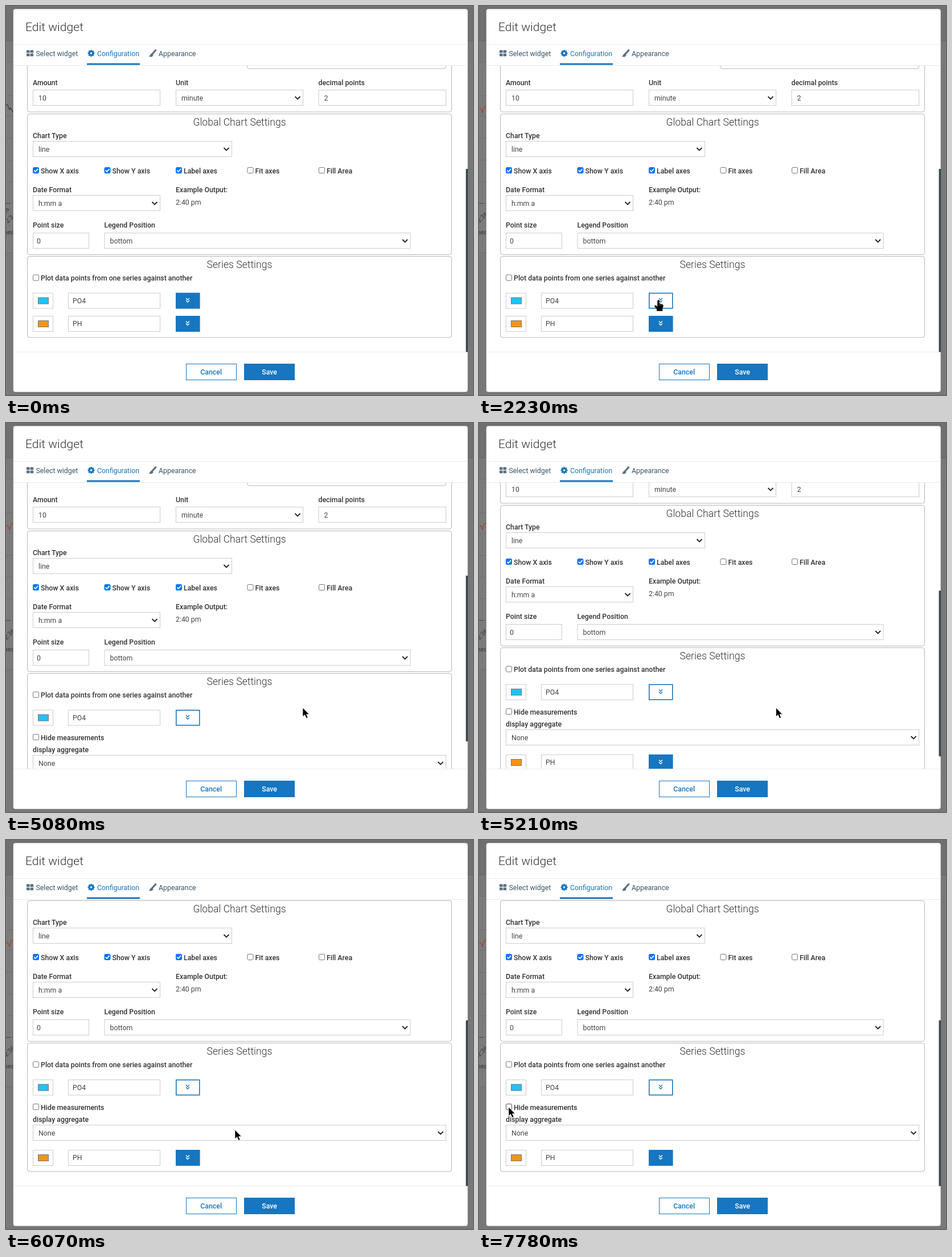
Animation of 820 by 683 pixels, one loop 8000 ms. Source, as an HTML page:

```html
<!DOCTYPE html>
<html lang="en">
<head>
<meta charset="utf-8">
<title>Edit widget</title>
<style>
html, body { margin: 0; width: 100%; height: 100%; overflow: hidden; background: #787878; }
svg { display: block; width: 820px; height: 683px; font: 400 12.35px Roboto, Arial, sans-serif; fill: #444; }
.label { font-weight: 500; fill: #333; }
.heading { font-weight: 300; font-size: 17.6px; fill: #333; text-anchor: middle; }
</style>
</head>
<body>
<svg id="stage" viewBox="0 0 820 683" xmlns="http://www.w3.org/2000/svg"></svg>
<script>
const LOOP = 8000;
const BLUE = '#1776bf';

// Markup helpers
const text = (x, y, s, cls = '', extra = '') => `<text x="${x}" y="${y}" class="${cls}" ${extra}>${s}</text>`;
const label = (x, y, s) => text(x, y, s, 'label');
const box = (x, y, w, h, fill = '#fff', stroke = 'none', rx = 0, extra = '') =>
  `<rect x="${x}" y="${y}" width="${w}" height="${h}" rx="${rx}" fill="${fill}" stroke="${stroke}" ${extra}/>`;
const line = (d, stroke, width = 1, extra = '') =>
  `<path d="${d}" fill="none" stroke="${stroke}" stroke-width="${width}" ${extra}/>`;
const group = (id, body, extra = '') => `<g id="${id}" ${extra}>${body}</g>`;

const input = (x, y, w, s) => box(x + .5, y + .5, w - 1, 27, '#fff', '#ccc') + text(x + 10, y + 18.5, s);
const select = (x, y, w, s) => input(x, y, w, s) +
  line(`M${x + w - 14.5} ${y + 12}l4.5 4.5l4.5-4.5`, '#222', 1.8);
const fieldset = (y, h) => box(37.5, y, 745, h, 'none', '#b5b5b5', 4);
const check = (x, y, s, on, id = '') =>
  box(x + .5, y + .5, 10, 10, on ? '#0075ff' : '#fff', on ? '#0075ff' : '#767676', 1.8, id && `id="${id}"`) +
  (on ? line(`M${x + 2.3} ${y + 5.6}l2.4 2.5l4.3-5`, '#fff', 1.7) : '') +
  label(x + 14, y + 10.5, s);
const chevrons = (x, y, color, id = '') =>
  line(`M${x - 3} ${y - 4}l3 3l3-3M${x - 3} ${y}l3 3l3-3`, color, 1.4, id && `id="${id}"`);

const series = (y, name, color, id) =>
  box(47.5, y + .5, 35, 27, '#fff', '#ccc') +
  box(56.5, y + 8.5, 18, 11, color, '#777') +
  box(109.5, y + .5, 161, 27, '#fff', '#ccc') + text(117, y + 18, name) +
  box(298.8, y + .8, 41, 26.4, BLUE, BLUE, 0, `id="${id}" stroke-width="1.6"`) +
  chevrons(319, y + 13.5, '#fff', id + 'Icon');

function backdrop() {
  const grid = [157, 193, 232, 270, 308, 346].map(y => `M0 ${y}.5H14`).join('');
  const tilted = (x, y, s) => text(x, y, s, '', `transform="rotate(-45 ${x} ${y})" style="fill:#333;font-size:11px"`);
  return box(0, 0, 820, 683, '#787878') + box(0, 0, 820, 60, '#707070') +
    box(0, 60, 820, 2, '#6b6b6b') + box(0, 98, 14, 335, '#7b7b7b') +
    line('M0 98.5H14M0 433.5H14', '#6c6c6c') + line(grid, '#6d6d6d') +
    line('M0 346.5H8', '#444') +
    group('chartBefore', line('M0 173l3 1l3 8l2-3l4 7h2', '#333', 1.2) + tilted(0, 365, 'm') + tilted(3, 382, '2:3')) +
    group('chartAfter', line('M0 181l3-1l3 7l4-11l4 1', '#a1402f', 1.2) + tilted(1, 381, '2:36')) +
    text(-7, 401, 'mea', '', 'style="fill:#333;font-size:11px"');
}

function header() {
  const teeth = Array.from({ length: 8 }, (_, i) =>
    box(148.2, 77, 2.8, 3, BLUE, 'none', .4, `transform="rotate(${i * 45} 149.6 83)"`)).join('');
  const tiles = [[36, 77.5], [42.6, 77.5], [36, 83.4], [42.6, 83.4]]
    .map(([x, y]) => box(x, y, 5.6, 4.8, '#5b7083', 'none', .5)).join('');
  return text(34, 43.5, 'Edit widget', '', 'style="font-weight:300;font-size:21.1px;fill:#333"') +
    line('M13 67.5H811', '#ececec') + line('M13 104.5H811', '#e8e8e8') +
    tiles + text(52.5, 88, 'Select widget', '', 'fill="#3c5468"') +
    teeth + `<circle cx="149.6" cy="83" r="3.2" fill="none" stroke="${BLUE}" stroke-width="2.8"/>` +
    text(160, 88, 'Configuration', '', `fill="${BLUE}"`) + box(142, 100.5, 93, 3, BLUE) +
    line('M257.5 83.5L262.8 77.6', '#5b7083', 3.2, 'stroke-linecap="round"') +
    '<path d="M256 83.2l2.6 2.5c-.5 3.6-4.4 4.6-7.7 2.8c2.4-.7 1.6-4.3 5.1-5.3z" fill="#5b7083"/>' +
    text(268, 88, 'Appearance', '', 'fill="#3c5468"');
}

function form() {
  return box(423.5, 60, 349, 50, 'none', '#b5b5b5', 4) + fieldset(40, 146) +
    label(47, 139, 'Amount') + input(47, 147, 224, '10') +
    label(298, 139, 'Unit') + select(298, 147, 224, 'minute') +
    label(548.5, 139, 'decimal points') + input(548.5, 147, 224.5, '2') +
    fieldset(189.5, 247) + text(410, 209.5, 'Global Chart Settings', 'heading') +
    label(47, 232, 'Chart Type') + select(47, 237, 350, 'line') +
    ['Show X axis', 'Show Y axis', 'Label axes', 'Fit axes', 'Fill Area']
      .map((s, i) => check(47 + i * 125.5, 283, s, i < 3)).join('') +
    label(47, 327, 'Date Format') + select(47, 332, 224, 'h:mm a') +
    label(298, 327, 'Example Output:') + text(298, 349, '2:40 pm') +
    label(47, 389, 'Point size') + input(47, 398, 99, '0').replace('x="57"', 'x="54"') +
    label(172.5, 389, 'Legend Position') + select(172.5, 398, 538, 'bottom') +
    box(37.5, 439.5, 745, 142.5, 'none', '#b5b5b5', 4, 'id="seriesBox"') +
    text(410, 460, 'Series Settings', 'heading') +
    check(47, 471.5, 'Plot data points from one series against another', false) +
    series(503.5, 'PO4', '#1fc3f5', 'firstButton') +
    group('details', check(47, 546, 'Hide measurements', false, 'hideCheck') +
      label(47, 577.5, 'display aggregate') + select(47, 583, 726, 'None')) +
    group('second', series(544, 'PH', '#f29417', 'secondButton'));
}

const footer = () => line('M13 607.5H811', '#ececec') +
  box(316.5, 628.5, 88, 28, '#fff', BLUE) + box(418, 628, 89, 29, BLUE) +
  text(360.2, 647, 'Cancel', 'label', `text-anchor="middle" style="fill:${BLUE}"`) +
  text(462.6, 647, 'Save', 'label', 'text-anchor="middle" style="fill:#fff"');

const arrow = '<path d="M0 0V15.6L3.6 12.3L6.3 18.4L9 17.2L6.4 11.4H11.2Z" fill="#000" stroke="#fff" stroke-width=".6"/>';
const hand = '<path d="M-1.8 1.5Q0-1.5 1.8 1.5V6.3L7.4 8Q8.8 8.6 8.6 11L7.2 15V19.5H-3V16.2L-7 11.8Q-7.2 9-4.6 9.6L-1.8 11.6Z" fill="#000"/>' +
  line('M1.8 7.5V9.6M4.4 8.3V10.2', '#fff', .6);

const stage = document.getElementById('stage');
stage.innerHTML =
  '<clipPath id="view"><rect x="13" y="105" width="798" height="502"/></clipPath>' +
  backdrop() + box(12.5, 5, 798.5, 673, '#fff', '#6a6a6a', 4, 'stroke-width=".6"') +
  header() + `<g clip-path="url(#view)">${group('form', form())}</g>` + footer() +
  box(807.5, 286, 3.5, 321, '#37474f', 'none', 0, 'id="thumb"') +
  '<circle id="press" cx="316" cy="518" r="10.5" fill="#e3dc1c" opacity=".7"/>' +
  group('arrow', arrow) + group('hand', hand);

const el = Object.fromEntries([...stage.querySelectorAll('[id]')].map(node => [node.id, node]));
const set = (node, attrs) => Object.entries(attrs).forEach(([k, v]) => node.setAttribute(k, v));
const show = (node, on) => node.setAttribute('visibility', on ? 'visible' : 'hidden');

// Pointer way points: tick, x, y
const PATH = [
  [0, 802, 676], [3, 722, 640], [6, 586, 566], [10, 400, 527], [13, 315, 516], [32, 316, 516],
  [34, 385, 511], [37, 521, 500], [39, 522, 500], [42, 522, 500], [43, 495, 502], [45, 402, 509],
  [47, 200, 495], [48, 110, 482], [49, 62, 477], [51, 73, 471], [55, 73, 471], [56, 68, 470], [59, 52, 469]
];

function pointerAt(tick) {
  const i = PATH.findIndex(p => p[0] > tick);
  if (i < 0) return PATH[PATH.length - 1].slice(1);
  const [a, b] = [PATH[i - 1], PATH[i]];
  const f = (tick - a[0]) / (b[0] - a[0]);
  return [1, 2].map(k => a[k] + (b[k] - a[k]) * f);
}

function render(ms) {
  const tick = Math.floor((ms - 500) / 123.7 + .2);
  const open = tick >= 28;
  const hovered = tick >= 12;
  const pressed = tick === 27;
  const scroll = tick < 38 ? 0 : tick < 39 ? 45 : tick < 40 ? 81 : 83;

  show(el.chartBefore, tick < 5);
  show(el.chartAfter, tick >= 5);
  show(el.details, open);
  set(el.form, { transform: `translate(0 ${-scroll})` });
  set(el.second, { transform: `translate(0 ${open ? 83 : 0})` });
  set(el.seriesBox, { height: open ? 225.5 : 142.5 });
  set(el.thumb, { y: open ? 268 + scroll * .585 : 286, height: open ? 291 : 321.5 });
  set(el.firstButton, { fill: pressed ? '#a0b1c0' : hovered ? '#fff' : BLUE });
  set(el.firstButtonIcon, { stroke: hovered ? BLUE : '#fff' });
  set(el.hideCheck, { stroke: tick >= 48 ? '#4f4f4f' : '#767676' });
  show(el.press, tick === 27 || tick === 28);

  const pointing = tick >= 14 && tick <= 32;
  show(el.arrow, tick >= 0 && !pointing);
  show(el.hand, pointing);
  if (tick >= 0) {
    const [x, y] = pointerAt(tick);
    set(pointing ? el.hand : el.arrow, { transform: `translate(${x} ${y})` });
  }
}

const start = performance.now();
function loop() {
  render((performance.now() - start) % LOOP);
  requestAnimationFrame(loop);
}
loop();
</script>
</body>
</html>
```
